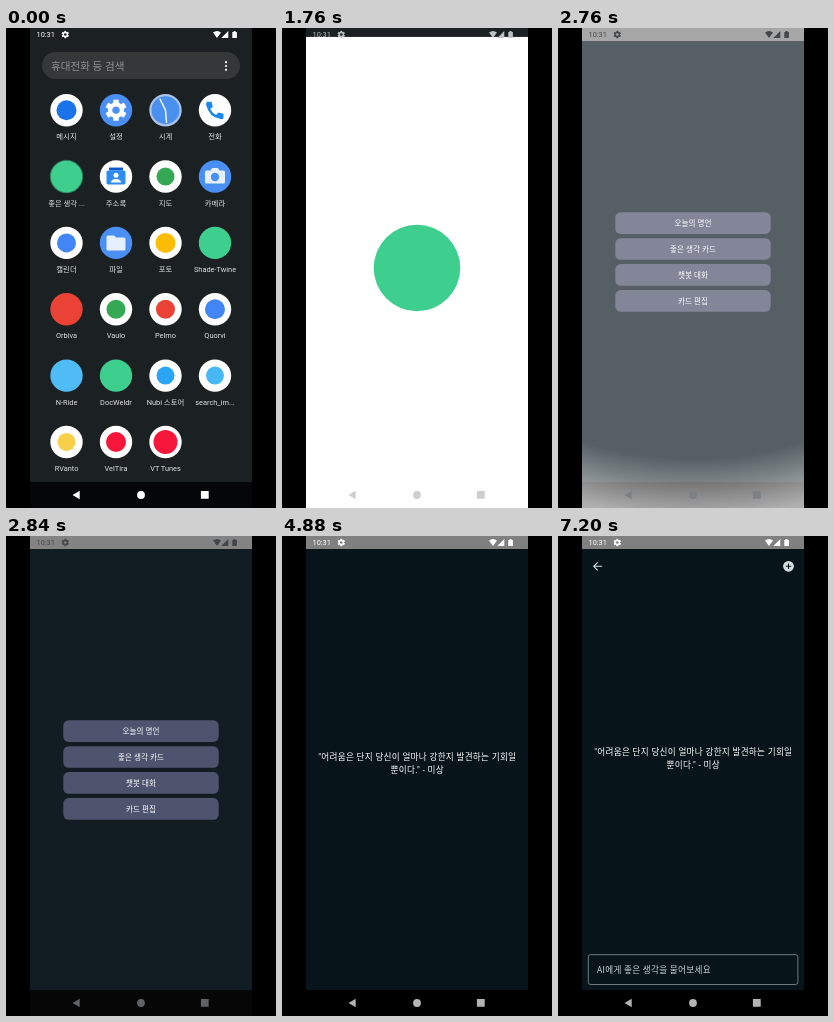
An HTML page for the animation above (8000 ms loop, 270x480 px).

```html
<!DOCTYPE html>
<html lang="ko">
<head>
<meta charset="utf-8">
<style>
  html, body { margin: 0; width: 100%; height: 100%; overflow: hidden; background: #000; }
  svg { display: block; width: 270px; height: 480px; }
  text { font-family: Roboto, "Noto Sans CJK KR", "Noto Sans CJK", sans-serif; }
  .mid { text-anchor: middle; }
  .label { font-size: 7.4px; fill: #dfe2e3; }
  .button { font-size: 7.56px; letter-spacing: .054px; fill: #fff; }
  .body { font-size: 8.64px; letter-spacing: .27px; }
  #pressed { transform-box: fill-box; transform-origin: center; }
</style>
</head>
<body>
<svg id="stage" viewBox="0 0 270 480">
  <defs>
    <radialGradient id="fade" gradientUnits="userSpaceOnUse" cx="135" cy="62" r="425">
      <stop offset=".86" stop-color="#fff" stop-opacity="0"/>
      <stop offset="1" stop-color="#fff" stop-opacity=".55"/>
    </radialGradient>
  </defs>

  <g id="launcher">
    <rect x="24" width="222" height="480" fill="#1b2022"/>
    <rect x="24" y="454" width="222" height="26" fill="#050607"/>
    <rect x="36" y="24" width="198" height="27" rx="13.5" fill="#343839"/>
    <text x="45" y="41.7" font-size="10.6" fill="#8d9294">휴대전화 등 검색</text>
    <g fill="#fff">
      <circle cx="220" cy="34.2" r="1.1"/><circle cx="220" cy="38" r="1.1"/><circle cx="220" cy="41.8" r="1.1"/>
    </g>
    <g id="apps"></g>
  </g>

  <g id="app">
    <rect x="24" width="222" height="480" fill="#000"/>
    <rect id="page" x="24" y="13" width="222" height="441" fill="#07141a"/>
    <rect x="24" width="222" height="13" fill="#808080"/>
    <g id="menu"></g>
    <g id="quote" class="body mid" fill="#fff">
      <text x="135.3" y="224">"어려움은 단지 당신이 얼마나 강한지 발견하는 기회일</text>
      <text x="135.3" y="237">뿐이다." - 미상</text>
    </g>
    <g id="chat">
      <path d="M44 30.3H36M39.7 26.3L35.7 30.3L39.7 34.3" fill="none" stroke="#d5dde1" stroke-width="1.1"/>
      <circle cx="230.5" cy="30.3" r="5.4" fill="#d5dde1"/>
      <path d="M227.8 30.3h5.4M230.5 27.6v5.4" stroke="#07141a" stroke-width="1.1"/>
      <rect x="30.3" y="418.7" width="209.6" height="29.8" rx="2.2" fill="none" stroke="#8b9499" stroke-width=".8"/>
      <text class="body" x="38.7" y="437" fill="#ccd4d9">AI에게 좋은 생각을 물어보세요</text>
    </g>
  </g>

  <rect id="white" x="24" width="222" height="480" fill="#fff"/>
  <rect id="ring" x="24" y="-700" width="222" height="2000" fill="url(#fade)"/>
  <circle id="badge" cx="135" cy="240" r="43.3" fill="#3ecf8e"/>

  <path d="M0 0h24v480H0zM246 0h24v480h-24z" fill="#000"/>
  <g id="status">
    <text x="30.5" y="9.2" font-size="7.4">10:31</text>
    <g id="statusGear"></g>
    <path d="M207 4.6Q211 1.6 215 4.6L211 10zM222.3 3v7h-7zM226.3 4h1.3v-1h2v1h1.3v6h-4.6z"/>
  </g>
  <g id="nav">
    <path d="M66.5 467L73.7 462.8v8.4zM194.9 463h7.8v7.8h-7.8z"/>
    <circle cx="135" cy="467" r="3.9"/>
  </g>
</svg>

<script>
const LOOP = 8000;
const R = 16.2;
const $ = id => document.getElementById(id);

const disc = (r, fill) => `<circle r="${r}" fill="${fill}"/>`;
const onWhite = (r, fill) => disc(R, '#fff') + disc(r, fill);

function gear(r, fill) {
  let teeth = '';
  for (let a = 0; a < 360; a += 60)
    teeth += `<rect x="${-r * .26}" y="${-r}" width="${r * .52}" height="${r * .4}" transform="rotate(${a})"/>`;
  return `<g fill="${fill}">${teeth}<circle r="${r * .56}" fill="none" stroke="${fill}" stroke-width="${r * .4}"/></g>`;
}

const settings = disc(R, '#4a8ff3') + gear(10.5, '#fff');
const clock = disc(R, '#aac3e6') + disc(14, '#4a90ee') +
  '<path d="M-5.5 -11L0 0L1 12" fill="none" stroke="#f1f6fe" stroke-width="1.5" stroke-linecap="round"/>';
const phone = disc(R, '#fff') +
  '<path d="M-8 -8.5h4.5l1.3 5l-2.6 2.4q2.2 4 5.8 6l2.5 -2.6l5 1.2v4.5q-1 1.2 -3 .9q-11.5 -2 -14.4 -14.4q-.2 -2 .9 -3z" fill="#1a88ee"/>';
const contacts = disc(R, '#fff') +
  '<path d="M-7 -9h14v3h-14z" fill="#0b57d0"/><rect x="-9.5" y="-6" width="19" height="14" rx="1.8" fill="#2d8cf0"/>' +
  '<circle cy="-1.2" r="2.5" fill="#fff"/><path d="M-5 6q0 -3.6 5 -3.6t5 3.6z" fill="#fff"/>';
const camera = disc(R, '#4a8ff3') +
  '<path d="M-8.5 -6h4l1.6 -2.5h5.8l1.6 2.5h4q1.5 0 1.5 1.5v10q0 1.5 -1.5 1.5h-17q-1.5 0 -1.5 -1.5v-10q0 -1.5 1.5 -1.5z" fill="#e6effd"/>' +
  '<circle cy=".5" r="4.2" fill="#4a8ff3"/>';
const folder = disc(R, '#4a8ff3') +
  '<path d="M-8 -7.5h6l2 2.2h8q1.5 0 1.5 1.5v9.8q0 1.5 -1.5 1.5h-16q-1.5 0 -1.5 -1.5v-12q0 -1.5 1.5 -1.5z" fill="#e6effd"/>';
const green = disc(R, '#3ecf8e');

const apps = [
  ['메시지', onWhite(10, '#1a73e8')], ['설정', settings], ['시계', clock], ['전화', phone],
  ['좋은 생각 ...', `<g id="pressed">${green}</g>`], ['주소록', contacts], ['지도', onWhite(9, '#34a853')], ['카메라', camera],
  ['캘린더', onWhite(9.5, '#4285f4')], ['파일', folder], ['포토', onWhite(10, '#fbbc04')], ['Shade-Twine', green],
  ['Orbiva', disc(R, '#ea4335')], ['Vaulo', onWhite(9.5, '#34a853')], ['Pelmo', onWhite(9.5, '#ea4335')], ['Quorvi', onWhite(10, '#4285f4')],
  ['N-Ride', disc(R, '#4fbcf7')], ['DocWeldr', green], ['Nubi 스토어', onWhite(9, '#2aa5f5')], ['search_im...', onWhite(9, '#45b8f5')],
  ['RVanto', onWhite(9, '#f8cf4a')], ['VelTira', onWhite(10, '#f5163a')], ['VT Tunes', onWhite(12, '#f5163a')]
];
$('apps').innerHTML = apps.map(([name, icon], i) => {
  const x = 60.5 + i % 4 * 49.5, y = 82.2 + Math.floor(i / 4) * 66.35;
  return `<g transform="translate(${x} ${y})">${icon}<text class="label mid" y="29.2">${name}</text></g>`;
}).join('');

$('menu').innerHTML = ['오늘의 명언', '좋은 생각 카드', '챗봇 대화', '카드 편집'].map((name, i) => {
  const y = 184.2 + i * 25.95;
  return `<rect x="57.3" y="${y}" width="155.4" height="21.7" rx="5.4" fill="#4b506b"/>
    <text class="button mid" x="135" y="${y + 13.7}">${name}</text>`;
}).join('');

$('statusGear').innerHTML = `<g transform="translate(59.3 6.5)">${gear(3.7, 'currentColor')}</g>`;

// Each track: element, property, then [time, value] steps.
const tracks = [
  ['pressed', 'transform', [1000, 'scale(1)'], [1280, 'scale(1.09)']],
  ['launcher', 'opacity', [1880, 1], [1880, 0]],
  ['app', 'opacity', [2560, 0], [2560, 1]],
  ['white', 'opacity', [1480, 0], [1480, 1], [2600, 1], [2640, .95], [2680, .8], [2720, .55],
    [2760, .31], [2800, .12], [2840, .025], [2880, 0]],
  ['white', 'transform', [1680, 'translateY(15px)'], [1880, 'translateY(0px)']],
  ['badge', 'opacity', [1480, 0], [1480, 1], [2520, 1], [2600, .48], [2680, 0]],
  ['ring', 'opacity', [2600, 0], [2600, 1], [2840, 1], [2840, 0]],
  ['ring', 'transform', [2600, 'translateY(-450px)'], [2760, 'translateY(0px)'], [2820, 'translateY(150px)']],
  ['page', 'fill', [2800, '#0b191f'], [3160, '#07141a']],
  ['status', 'color', [1680, '#ffffff'], [1880, '#5f6368'], [2600, '#5f6368'], [2760, '#43474a'],
    [2880, '#43474a'], [3160, '#ffffff']],
  ['nav', 'fill', [1680, '#ffffff'], [1880, '#80868b'], [2760, '#7c8185'], [2840, '#5e6366'], [3160, '#b4b4b4']],
  ['menu', 'opacity', [3720, 1], [4560, 0]],
  ['quote', 'opacity', [4560, 0], [4880, 1]],
  ['quote', 'transform', [6840, 'translateY(0px)'], [7200, 'translateY(-5px)']],
  ['chat', 'opacity', [6840, 0], [7200, 1]]
];
$('status').style.fill = 'currentColor';

const start = document.timeline.currentTime || 0;
for (const [id, prop, ...steps] of tracks) {
  const all = [[0, steps[0][1]], ...steps, [LOOP, steps[steps.length - 1][1]]];
  const frames = all.map(([t, v]) => ({ offset: t / LOOP, [prop]: v }));
  $(id).animate(frames, { duration: LOOP, iterations: Infinity }).startTime = start;
}
</script>
</body>
</html>
```
